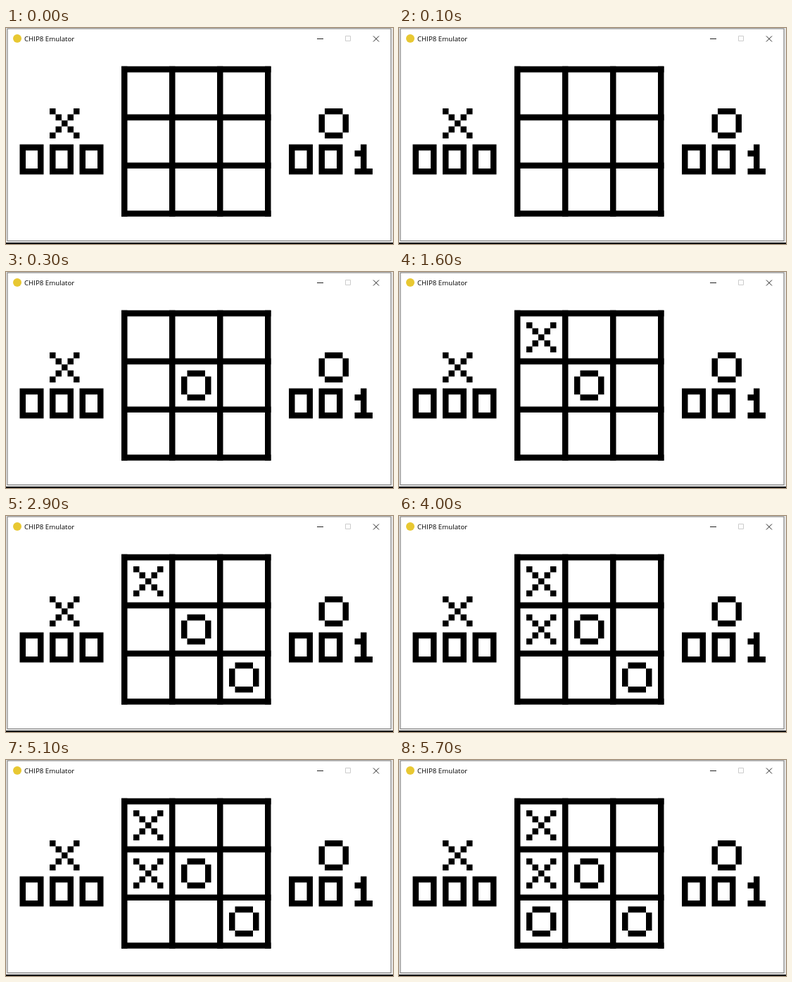
Write an HTML page that moves like this. It is 550 by 309 pixels and loops after 8000 ms.

```html
<!DOCTYPE html>
<html lang="en">
<head>
<meta charset="utf-8">
<title>Noughts and crosses</title>
<style>
  html, body { margin: 0; width: 100%; height: 100%; overflow: hidden; background: #fff; }
  svg { display: block; width: 100%; height: 100%; }
  text { font: 9.7px "Open Sans", "Noto Sans", sans-serif; }
</style>
</head>
<body>
<svg viewBox="0 0 550 309">
  <rect width="550" height="309" fill="#e4e4e4"/>
  <rect y="307" width="550" height="2"/>
  <rect x="2" y="1" width="545" height="303.5" fill="#fff" stroke="#777"/>
  <circle cx="16" cy="15" r="6" fill="#e8c832"/>
  <text x="26" y="19">CHIP8 Emulator</text>
  <g fill="none" stroke="#222">
    <path d="M442 15.5h9"/>
    <path d="M482.5 11.5h7v7h-7z" stroke="#ccc"/>
    <path d="M522 11.5l8 8m0-8l-8 8"/>
  </g>
  <g id="screen" transform="translate(2.5 29) scale(8.5 8.6)"></g>
</svg>
<script>
const LOOP = 8000;
const SPRITES = {
  X: ['#...#', '.#.#.', '..#..', '.#.#.', '#...#'],
  O: ['.###.', '#...#', '#...#', '#...#', '.###.'],
  0: ['####', '#..#', '#..#', '#..#', '####'],
  1: ['..#.', '.##.', '..#.', '..#.', '.###']
};
const screen = document.getElementById('screen');

function addPath(d) {
  const path = document.createElementNS('http://www.w3.org/2000/svg', 'path');
  path.setAttribute('d', d);
  return screen.appendChild(path);
}

function addSprite(name, x, y) {
  let d = '';
  SPRITES[name].forEach((row, j) => {
    for (const run of row.matchAll(/#+/g)) {
      d += `M${x + run.index} ${y + j}h${run[0].length}v1h${-run[0].length}z`;
    }
  });
  return addPath(d);
}

function addScore(name, digits, x) {
  addSprite(name, x + 5, 10);
  [...digits].forEach((digit, i) => addSprite(digit, x + 5 * i, 16));
}

// Board: four bars each way
for (let i = 0; i < 4; i++) {
  addPath(`M${19 + 8 * i} 3h1v25h-1z`);
  addPath(`M19 ${3 + 8 * i}h25v1h-25z`);
}
addScore('X', '000', 2);
addScore('O', '001', 47);

// Moves: time, mark, column, row
const moves = [
  [300, 'O', 1, 1],
  [1600, 'X', 0, 0],
  [2900, 'O', 2, 2],
  [4000, 'X', 0, 1],
  [5700, 'O', 0, 2]
].map(([time, mark, col, row]) => ({ time, path: addSprite(mark, 21 + 8 * col, 5 + 8 * row) }));

function draw() {
  const t = performance.now() % LOOP;
  for (const { time, path } of moves) {
    path.style.visibility = t >= time ? 'visible' : 'hidden';
  }
  requestAnimationFrame(draw);
}
draw();
</script>
</body>
</html>
```
